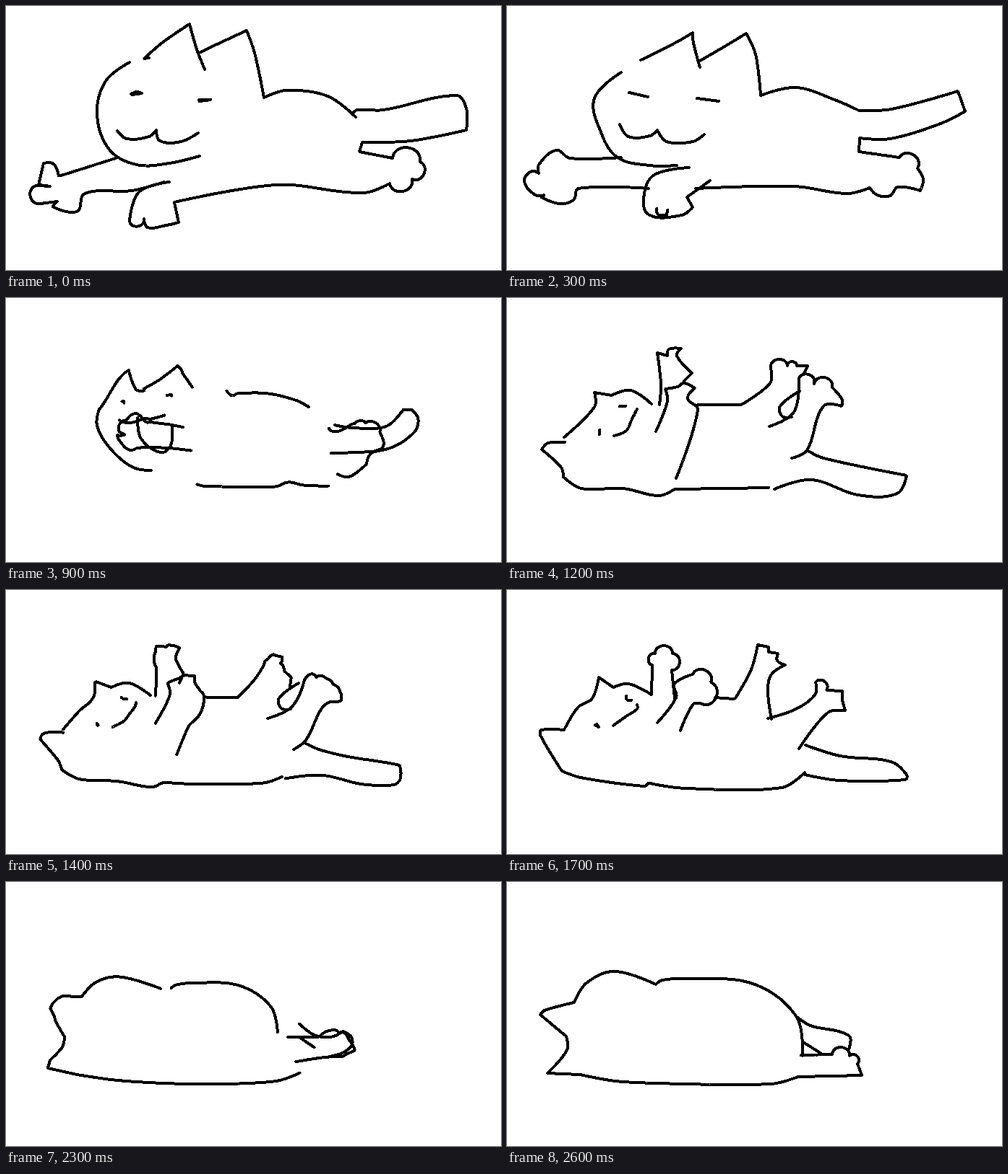
Write an HTML page that moves like this. It is 685 px wide and 366 px high and loops after 2700 ms.

```html
<!DOCTYPE html>
<html lang="en">
<head>
<meta charset="utf-8">
<title>Rolling cat</title>
<style>
html, body { margin: 0; width: 100%; height: 100%; overflow: hidden; background: #fff; }
svg { display: block; width: 100vw; height: 100vh; }
path { fill: none; stroke: #000; stroke-width: 4; stroke-linecap: round; stroke-linejoin: round; shape-rendering: crispEdges; }
</style>
</head>
<body>
<svg id="stage" viewBox="0 0 685 366"></svg>
<script>
const LOOP = 2700, STEP = 100, N = 160;
const NS = "http://www.w3.org/2000/svg";
const stage = document.getElementById("stage");
const make = () => stage.appendChild(document.createElementNS(NS, "path"));
const lerp = (a, b, k) => a + (b - a) * k;
const lines = {}, poses = [];
const probe = make();

function unit(a, b) {
  const x = b.x - a.x, y = b.y - a.y, l = Math.hypot(x, y) || 1;
  return { x: x / l, y: y / l };
}

// Stroke notation: "~" goes on from the last stroke, "o" and "u" draw a
// round toe to the left or right of the way, other points are smoothed.
function parse(text, last) {
  return text.split(" ").map(s => {
    if (s === "~") return { ...last, side: 0 };
    const [x, y] = s.replace(/[ou]/, "").split(",").map(Number);
    return { x, y, side: s[0] === "o" ? 1 : s[0] === "u" ? -1 : 0 };
  });
}

function curve(pts) {
  const still = { x: 0, y: 0 };
  const dirs = pts.map((p, i) => {
    const a = pts[i - 1], b = pts[i + 1];
    if (!a || !b || p.side || b.side) return still;
    const u = unit(a, p), v = unit(p, b);
    return u.x * v.x + u.y * v.y < 0.2 ? still : unit(a, b);
  });
  let d = `M${pts[0].x},${pts[0].y}`;
  for (let i = 1; i < pts.length; i++) {
    const a = pts[i - 1], b = pts[i], way = unit(a, b);
    const len = Math.hypot(b.x - a.x, b.y - a.y);
    let u = dirs[i - 1], v = dirs[i], h = len * 0.35;
    if (b.side) {
      h = len * 0.6;
      u = { x: way.y * b.side, y: -way.x * b.side };
      v = { x: -u.x, y: -u.y };
    }
    d += `C${a.x + u.x * h},${a.y + u.y * h} ${b.x - v.x * h},${b.y - v.y * h} ${b.x},${b.y}`;
  }
  return d;
}

// Evenly spaced points, so that any two strokes can be blended.
function sample(pts) {
  probe.setAttribute("d", curve(pts));
  const len = probe.getTotalLength();
  return Array.from({ length: N + 1 }, (_, i) => probe.getPointAtLength(len * i / N));
}

function pose(t, parts) {
  const shapes = {};
  let last;
  for (const name in parts) {
    const pts = parse(parts[name], last);
    last = pts[pts.length - 1];
    shapes[name] = sample(pts);
    lines[name] = lines[name] || make();
  }
  poses.push({ t, shapes });
}

pose(0, {
  head: "171,78 138,104 126,150 143,199 181,220 226,218 268,208",
  earL: "198,72 191,73 216,51 254,25 264,60 275,88",
  earR: "267,65 292,53 333,34 344,65 357,127",
  top: "~ 388,117 445,125 484,154",
  tail: "480,149 486,144 522,144 623,124 637,142 637,172 560,187 493,189",
  hind: "~ 489,202 535,211 o573,216 o562,240 o531,246",
  bottom: "~ 502,258 471,258 374,248 233,272",
  pawA: "152,211 73,236 66,219 52,218 45,248 62,250 42,249 u48,274 71,271 64,278 98,285 109,260 174,256 219,244",
  pawB: "226,244 184,258 171,298 u191,295 196,307 222,304 239,300 233,273",
  mouth: "154,173 167,184 198,181 208,172 213,187 242,188 266,176",
  eyeL: "173,122 181,119 188,121 175,123",
  eyeR: "267,130 283,130 268,132"
});
pose(300, {
  head: "158,92 121,128 130,175 153,210 197,221 235,221",
  earL: "185,75 233,51 257,37 258,51 267,85",
  earR: "267,76 303,55 331,38 344,67 351,124",
  top: "~ 400,113 456,131 487,145",
  tail: "~ 532,143 624,118 634,146 600,163 530,184 488,183",
  hind: "~ 487,202 543,210 o568,225 576,240 572,256 541,251 530,263 512,262 502,252",
  bottom: "~ 471,260 396,250 261,253",
  pawA: "158,210 87,211 68,200 44,220 44,232 34,229 24,243 39,262 52,262 47,265 72,274 92,269 99,253 196,253",
  pawB: "252,224 204,234 190,260 196,289 242,290 257,279 249,265 281,242",
  toes: "207,281 209,289 221,290 222,283",
  mouth: "156,164 168,181 198,180 208,172 221,188 257,188 273,178",
  eyeL: "169,120 195,126",
  eyeR: "263,128 293,132"
});
pose(700, {
  head: "163,91 137,117 130,165 150,204 180,222",
  earL: "163,93 217,46 250,29 251,78 265,81",
  earR: "~ 290,70 319,51 333,116",
  top: "~ 342,127 352,122 407,122 460,138 482,153",
  tail: "~ 540,147 555,133 556,95 587,99 600,130 564,184 503,182",
  hind: "~ 492,192 500,206 532,219 o562,228 562,242 546,264 545,274 515,275 502,259",
  bottom: "~ 462,257 436,250 415,260 298,258 286,254",
  pawA: "245,222 171,225 163,227 143,213 117,236 u120,264 126,266 110,264 118,276 145,295 165,283 230,264 286,254",
  mouth: "163,155 175,163 208,161 218,167 246,168",
  tongue: "182,166 187,195 214,214 228,204 230,177",
  eyeL: "182,117 187,114 187,117",
  eyeR: "267,125 273,123 273,126"
});
pose(1200, {
  head: "78,248 103,264 160,264 210,274 232,265",
  earL: "78,248 75,235 48,210 57,201 80,200",
  earR: "79,193 121,151 121,131 145,135",
  brow: "~ 171,128 200,147",
  top: "264,148 324,148",
  tail: "415,211 438,222 553,246 540,271 486,273 421,252 370,265",
  hind: "363,178 397,158 404,112 o425,119 o450,124 464,141 463,150 438,150 415,211 394,222",
  bottom: "362,263 232,265",
  pawA: "245,115 256,104 235,80 241,70 224,71 222,80 208,76 213,120 211,148",
  pawB: "206,185 222,143 219,126 236,123 245,118 260,125 250,139 264,155 234,250",
  legC: "324,148 364,118 365,97 o388,94 o401,94 416,94 411,105",
  legE: "405,129 378,150 381,164 394,165",
  mouth: "148,191 165,184 172,170 180,154",
  eyeL: "128,183 128,189",
  eyeR: "156,150 164,150"
});
pose(1700, {
  head: "76,251 102,260 190,272 196,268 202,269",
  earL: "76,251 46,201 48,194 79,194",
  earR: "~ 98,163 118,150 127,121 147,135",
  brow: "~ 168,130 200,145",
  top: "288,149 314,151",
  tail: "413,215 461,230 531,238 553,256 551,263 460,264 412,256",
  hind: "361,178 400,165 427,144 427,128 o442,139 464,140 464,152 468,167 444,170 404,220",
  bottom: "412,253 380,274 247,275 202,269",
  pawA: "232,150 228,111 u229,88 u205,88 u201,104 200,145",
  pawB: "208,184 234,149 232,130 257,117 o282,128 o270,158 258,158 240,195",
  legC: "316,150 338,110 347,76 362,79 362,86 375,88 374,98 385,104 366,117 361,140 366,179",
  mouth: "147,188 165,175 180,165 180,159",
  eyeL: "122,187 127,190 124,186",
  eyeR: "165,147 166,152 172,153"
});
pose(2100, {
  head: "93,267 230,279",
  earL: "93,267 48,237 80,217",
  earR: "~ 80,183 88,176 89,140 96,131 125,146",
  brow: "~ 155,137 190,149 228,158",
  top: "269,156 280,149 317,150",
  tail: "415,214 450,241 494,238 516,213 532,235 510,262 450,269 412,257",
  hind: "360,171 412,170 428,160 o447,162 o464,182 462,196 440,196 398,212",
  bottom: "413,255 385,269 306,279 230,279",
  pawA: "205,155 218,150 215,125 203,117 188,130 165,158",
  pawB: "211,166 234,150 235,132 224,115 239,113 o259,107 275,118 262,165 243,192",
  legC: "309,148 304,103 o314,85 o340,87 o335,112 346,148",
  legE: "335,111 358,112 342,126 350,128 366,100 o397,92 o404,112 o391,131 384,147 370,166",
  tickA: "402,160 416,179",
  tickB: "420,149 433,176",
  tickC: "404,207 412,214",
  eyeR: "136,152 151,147"
});
pose(2600, {
  head: "101,267 150,276 210,279",
  earL: "101,267 56,265 83,233 82,214",
  earR: "~ 46,184 52,178 93,167",
  brow: "~ 110,140 149,124 206,142",
  top: "~ 215,136 250,134 340,141 400,186 409,241",
  tail: "401,187 420,199 473,213 473,232",
  hind: "407,240 450,239 o474,241 o485,252 491,268 403,270",
  bottom: "~ 365,280 210,279",
  tickC: "410,222 435,238"
});
probe.remove();

function draw(ms) {
  const t = Math.floor(ms % LOOP / STEP) * STEP;
  let i = 0;
  while (i < poses.length - 2 && t >= poses[i + 1].t) i++;
  const from = poses[i], to = poses[i + 1];
  let k = (t - from.t) / (to.t - from.t);
  if (i === poses.length - 2) k = 1 - (1 - k) ** 2; // settles to sleep
  for (const name in lines) {
    const a = from.shapes[name], b = to.shapes[name];
    let pts = k < 0.5 ? a : b;
    if (a && b) pts = a.map((p, j) => ({ x: lerp(p.x, b[j].x, k), y: lerp(p.y, b[j].y, k) }));
    lines[name].setAttribute("d", pts ? "M" + pts.map(p => p.x.toFixed(1) + " " + p.y.toFixed(1)).join("L") : "");
  }
}

const start = performance.now();
function tick() {
  draw(performance.now() - start);
  requestAnimationFrame(tick);
}
tick();
</script>
</body>
</html>
```
